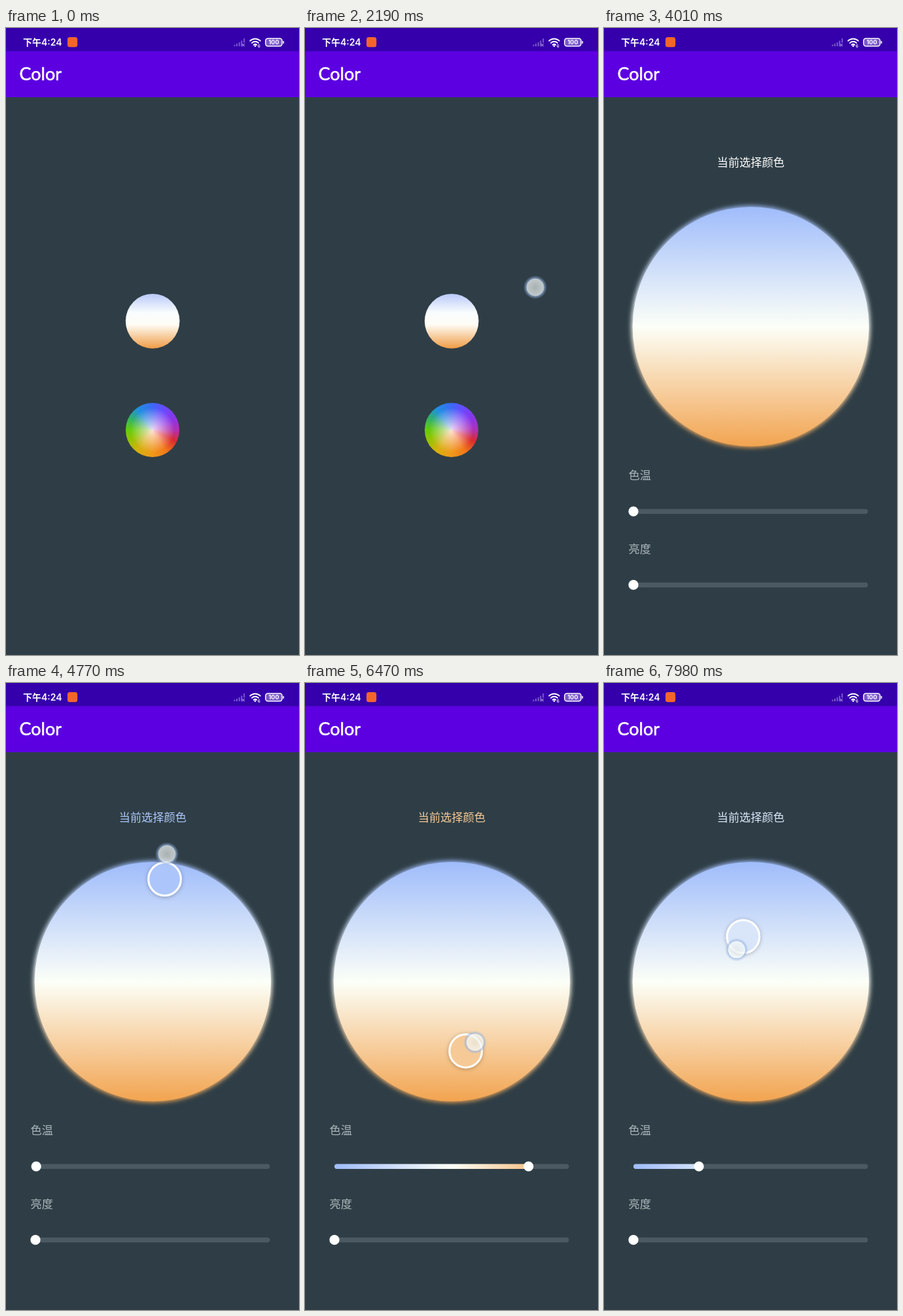
An HTML page for the animation above (8 s loop, 448x960 px).

```html
<!DOCTYPE html>
<html lang="zh">
<head>
<meta charset="utf-8">
<title>Color</title>
<style>
  html, body { margin: 0; width: 100%; height: 100%; overflow: hidden; background: #2f3e46; }
  svg { display: block; position: absolute; left: 0; top: 0; }
  text { font-family: Inter, "Noto Sans CJK SC", "Noto Sans CJK", sans-serif; fill: #fff; }
  .title { font: 27px Lato, sans-serif; stroke: #fff; stroke-width: .6px; }
  .label { font-size: 17.2px; font-family: "Noto Sans CJK SC", "Noto Sans CJK", sans-serif; }
  .dim { fill: #abb6ba; }
  .hues {
    width: 82.6px; height: 83.8px; border-radius: 50%;
    background:
      radial-gradient(closest-side, rgba(255,236,240,.88), rgba(255,236,240,.55) 30%, rgba(255,236,240,0) 82%),
      conic-gradient(#3c68f6, #6a48ff 30deg, #8a35ea 60deg, #b030b2 90deg, #da2a30 116deg,
        #f27a1a 148deg, #f0991a 180deg, #d8b010 215deg, #90c400 248deg, #62cc10 272deg,
        #30b070 300deg, #2090e0 325deg, #3c68f6);
  }
</style>
</head>
<body>
<svg width="448" height="960" viewBox="0 0 448 960">
  <defs>
    <linearGradient id="warmth" x2="0" y2="1">
      <stop stop-color="#9fbcfb"/><stop offset=".5" stop-color="#fcfff8"/><stop offset="1" stop-color="#f2a450"/>
    </linearGradient>
    <linearGradient id="smallWarmth" x2="0" y2="1">
      <stop stop-color="#b9c8fa"/><stop offset=".34" stop-color="#f8fcfd"/>
      <stop offset=".56" stop-color="#fefdf6"/><stop offset="1" stop-color="#f09c45"/>
    </linearGradient>
    <linearGradient id="trackWarmth" gradientUnits="userSpaceOnUse" x1="45" x2="403">
      <stop stop-color="#9fbcfb"/><stop offset=".5" stop-color="#fcfff8"/><stop offset="1" stop-color="#f2a450"/>
    </linearGradient>
    <radialGradient id="touchFill">
      <stop stop-color="#e8ebe8" stop-opacity=".66"/><stop offset="1" stop-color="#f4fbfa" stop-opacity=".74"/>
    </radialGradient>
    <radialGradient id="touchGlow">
      <stop offset=".7" stop-color="#96b2e0" stop-opacity="0"/>
      <stop offset=".73" stop-color="#96b2e0" stop-opacity=".75"/>
      <stop offset="1" stop-color="#96b2e0" stop-opacity="0"/>
    </radialGradient>
    <filter id="blur" x="-10%" y="-10%" width="120%" height="120%"><feGaussianBlur stdDeviation="3.5"/></filter>
    <filter id="shadow" x="-30%" y="-30%" width="160%" height="160%">
      <feDropShadow dx="0" dy="1" stdDeviation="3" flood-opacity=".28"/>
    </filter>
    <g id="chrome">
      <path fill="#2f3e46" d="M0 0h448v960H0z"/>
      <path fill="#5c00e2" d="M0 35h448v71H0z"/>
      <path fill="#3500ac" d="M0 0h448v35.5H0z"/>
      <text class="title" x="20.5" y="80">Color</text>
    </g>
    <g id="track">
      <rect x="45" y="-3.7" width="358.5" height="7.4" rx="3.7" fill="#4b5a62"/>
    </g>
  </defs>

  <g id="home">
    <use href="#chrome"/>
    <ellipse cx="224.2" cy="448.8" rx="41.3" ry="41.9" fill="url(#smallWarmth)"/>
    <foreignObject x="182.9" y="573.6" width="84" height="85"><div class="hues"></div></foreignObject>
  </g>
  <path id="shade" d="M0 0h448v960H0z" opacity="0"/>

  <g id="picker">
    <use href="#chrome"/>
    <text id="caption" class="label" x="224.3" y="212.3" text-anchor="middle">当前选择颜色</text>
    <ellipse cx="224.4" cy="457.2" rx="182.5" ry="185" fill="url(#warmth)" filter="url(#blur)"/>
    <ellipse cx="224.4" cy="457.2" rx="180.7" ry="183.3" fill="url(#warmth)"/>
    <g id="handle" filter="url(#shadow)">
      <ellipse id="swatch" rx="24.8" ry="25.3" stroke="#fff" stroke-width="3"/>
    </g>
    <text class="label dim" x="37.6" y="691.2">色温</text>
    <use href="#track" y="740.2"/>
    <rect id="level" x="45" y="736.5" height="7.4" rx="3.7" fill="url(#trackWarmth)"/>
    <circle id="knob" cy="740.2" r="7.6" fill="#fff"/>
    <text class="label dim" x="37.6" y="803.6">亮度</text>
    <use href="#track" y="852.7"/>
    <circle cx="45" cy="852.7" r="7.6" fill="#fff"/>
  </g>

  <g id="status">
    <text x="26" y="27" font-size="14" font-weight="600">下午4:24</text>
    <rect x="94" y="14" width="15.2" height="15.2" rx="3.5" fill="#f4652c"/>
    <path d="M349.5 28v-2.5M353 28v-4M356.7 28v-6M360.3 28v-8.5M364.2 22.5V16" stroke="#7a58cc" stroke-width="2"/>
    <path d="M360.8 24.2l4 4m0-4l-4 4" stroke="#9a82da" stroke-width="1.2"/>
    <g fill="none" stroke="#fff" stroke-width="1.9" stroke-linecap="round">
      <path d="M373.2 19.7a11 11 0 0 1 15.6 0M376 22.9a7 7 0 0 1 10 0M378.7 25.8a3.2 3.2 0 0 1 4.6 0"/>
      <rect x="396.9" y="16.1" width="25.2" height="11.6" rx="3.4" stroke-width="1.5" fill="#7b58cb"/>
      <path d="M424.3 20.6v2.6" stroke-width="1.6"/>
    </g>
    <circle cx="381" cy="27.6" r="1.4" fill="#fff"/>
    <text x="385" y="29.6" font-size="6" font-weight="600">6</text>
    <text x="409.5" y="25.2" font-size="9" font-weight="700" text-anchor="middle">100</text>
  </g>

  <g id="touch">
    <circle r="18" fill="url(#touchGlow)"/>
    <circle r="13.2" fill="url(#touchFill)"/>
  </g>
</svg>
<script>
const LOOP = 8000, WIDTH = 448, SLIDE_START = 3015, LAG = 60, FADE = 120;
const CENTER = { x: 224.4, y: 457.2 }, REACH = 158;
const COOL = [159, 188, 251], NEUTRAL = [252, 255, 248], WARM = [242, 164, 80];

// Strokes of the finger as [time, x, y]
const drag = [
  [4230, 226, 440], [4450, 232, 360], [4710, 244, 288], [4770, 246, 262], [4950, 252, 242],
  [5200, 262, 330], [5450, 236, 530], [5690, 213, 650], [5750, 212, 665], [5950, 205, 678],
  [6250, 215, 600], [6600, 290, 520], [6850, 342, 450], [7030, 335.5, 377.5], [7090, 323, 349],
  [7250, 285, 305], [7550, 240, 300], [7800, 228, 355], [7920, 213, 388], [7980, 203, 408], [8000, 200, 414]
];
const strokes = [
  [[2060, 352, 397], [2280, 352, 397]],
  [[2840, 227, 452], [2960, 227, 452]],
  drag
];

const el = {};
for (const node of document.querySelectorAll('svg > g, svg > path, #picker [id]')) el[node.id] = node;

const clamp = (v, lo, hi) => Math.min(hi, Math.max(lo, v));
const set = (node, attrs) => { for (const k in attrs) node.setAttribute(k, attrs[k]); };
const moveTo = (node, x, y) => set(node, { transform: `translate(${x} ${y})` });

// Smooth curve through unevenly timed points
function along(points, time) {
  const last = points.length - 1;
  const t = clamp(time, points[0][0], points[last][0]);
  const i = clamp(points.findIndex(p => p[0] > t) - 1, 0, last - 1);
  const k = t === points[last][0] ? last - 1 : i;
  const a = points[k], b = points[k + 1], span = b[0] - a[0], u = (t - a[0]) / span;
  const slope = (n, axis) => {
    const p = points[Math.max(0, n - 1)], q = points[Math.min(last, n + 1)];
    return (q[axis] - p[axis]) / (q[0] - p[0]) * span;
  };
  const at = axis => {
    const d = b[axis] - a[axis], m = slope(k, axis), n = slope(k + 1, axis);
    return a[axis] + u * (m + u * (3 * d - 2 * m - n + u * (m + n - 2 * d)));
  };
  return { x: at(1), y: at(2) };
}

function warmthColor(v) {
  const [from, to, u] = v < .5 ? [COOL, NEUTRAL, v * 2] : [NEUTRAL, WARM, v * 2 - 1];
  return `rgb(${from.map((c, i) => Math.round(c + (to[i] - c) * u))})`;
}

function drawSlide(t) {
  const s = Math.max(0, t - SLIDE_START) * .018;
  const rest = (1 + s) * Math.exp(-s);
  const x = rest * WIDTH;
  moveTo(el.picker, x < .3 ? 0 : x, 0);
  moveTo(el.home, -(1 - rest) * WIDTH / 4, 0);
  set(el.shade, { opacity: .31 * (1 - rest) });
}

function drawPicker(t) {
  const active = t >= drag[0][0];
  el.handle.style.display = el.level.style.display = active ? '' : 'none';
  let value = 0;
  if (active) {
    const p = along(drag, t - LAG);
    const dx = p.x - CENTER.x, dy = p.y - CENTER.y;
    const scale = Math.min(1, REACH / Math.hypot(dx, dy));
    const y = CENTER.y + dy * scale;
    moveTo(el.handle, CENTER.x + dx * scale, y);
    value = clamp((y - CENTER.y + REACH) / (2 * REACH), 0, 1);
    set(el.swatch, { fill: warmthColor((y - CENTER.y + 183.3) / 366.6) });
    set(el.level, { width: 355 * value });
  }
  el.caption.style.fill = active ? el.swatch.getAttribute('fill') : '#fff';
  set(el.knob, { cx: 45 + 355 * value });
}

function drawTouch(t) {
  const stroke = strokes.find(s => t >= s[0][0] && t < s[s.length - 1][0] + FADE);
  el.touch.style.display = stroke ? '' : 'none';
  if (!stroke) return;
  const p = along(stroke, t);
  moveTo(el.touch, p.x, p.y);
  set(el.touch, { opacity: 1 - clamp((t - stroke[stroke.length - 1][0]) / FADE, 0, 1) });
}

const start = performance.now();
function draw() {
  const t = (performance.now() - start) % LOOP;
  drawSlide(t);
  drawPicker(t);
  drawTouch(t);
  requestAnimationFrame(draw);
}
draw();
</script>
</body>
</html>
```
